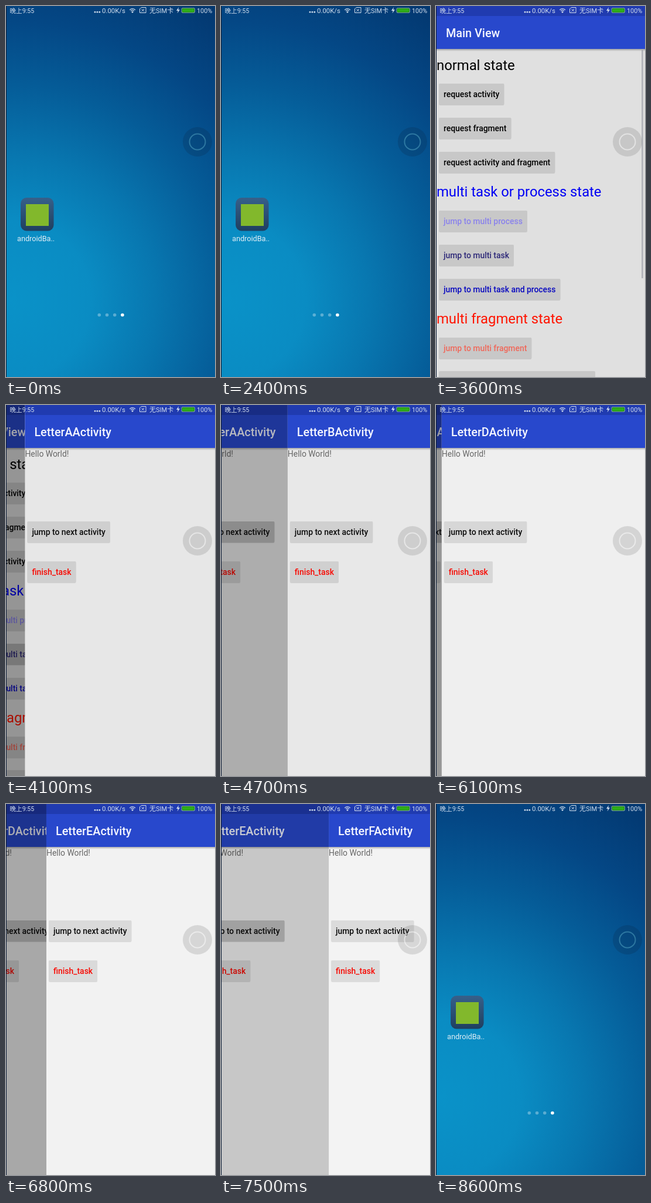
Write an HTML page with a canvas that moves like this. It is 357x631 px and loops after 9400 ms.

```html
<!DOCTYPE html>
<html lang="en">
<head>
<meta charset="utf-8">
<title>Activity transitions</title>
<style>
html, body { margin: 0; width: 100%; height: 100%; overflow: hidden; background: #064d8e; }
canvas { display: block; width: 357px; height: 631px; }
</style>
</head>
<body>
<canvas id="stage" width="357" height="631"></canvas>
<script>
const W = 357, H = 631, LOOP = 9400, SLIDE = 357, EDGE = 1;
const ctx = document.getElementById('stage').getContext('2d');
const ROBOTO = 'Roboto, sans-serif';
const STATUS_FONT = 'Roboto, "Noto Sans CJK SC", "Noto Sans CJK", sans-serif';

// The pages brighten slightly one after another.
const shades = { A: 231, B: 232, C: 236, D: 239, E: 242, F: 243 };
const slides = [
  { from: 'Main', to: 'A', start: 3850, press: 3600 },
  { from: 'A', to: 'B', start: 4545, press: 4400 },
  { from: 'B', to: 'C', start: 5100, press: 4960 },
  { from: 'C', to: 'D', start: 5800, press: 5690 },
  { from: 'D', to: 'E', start: 6600, press: 6390 },
  { from: 'E', to: 'F', start: 7400, press: 7290 }
];
const OPEN = 2420, CLOSE = 8180, ZOOM = 400;

const clamp = v => Math.max(0, Math.min(1, v));
const easeOut = p => 1 - (1 - p) ** 2;
const gray = (v, a = 1) => `rgba(${v},${v},${v},${a})`;

function rect(x, y, w, h, color) {
  ctx.fillStyle = color;
  ctx.fillRect(x, y, w, h);
}

function roundRect(x, y, w, h, r, color) {
  ctx.beginPath();
  ctx.roundRect(x, y, w, h, r);
  ctx.fillStyle = color;
  ctx.fill();
}

function disc(x, y, r, color) {
  ctx.beginPath();
  ctx.arc(x, y, r, 0, Math.PI * 2);
  ctx.fillStyle = color;
  ctx.fill();
}

function text(str, x, baseline, size, color, weight = 400, family = ROBOTO) {
  ctx.font = `${weight} ${size}px ${family}`;
  ctx.fillStyle = color;
  ctx.fillText(str, x, baseline);
}

function gradient(y0, y1, from, to) {
  const g = ctx.createLinearGradient(0, y0, 0, y1);
  g.addColorStop(0, from);
  g.addColorStop(1, to);
  return g;
}

function drawLauncher() {
  const g = ctx.createRadialGradient(10, 500, 0, 10, 500, 610);
  [[0, '#0a92c8'], [.22, '#0a8cc3'], [.4, '#0877b0'], [.6, '#055c98'], [.78, '#044785'], [1, '#03376f']]
    .forEach(([at, color]) => g.addColorStop(at, color));
  rect(0, 0, W, H, g);
  roundRect(25, 326, 56.5, 56.5, 10, gradient(326, 382, '#37608a', '#1f3f60'));
  rect(34, 337, 39, 37, '#82b82c');
  text('androidBa..', 19, 400, 12.7, '#e0eef6');
  for (let i = 0; i < 4; i++) {
    disc(159.3 + i * 13.2, 525.5, 2.8, gray(255, i === 3 ? 1 : .33));
  }
}

function button(label, y, color, shade, pressed) {
  ctx.font = `500 13.9px ${ROBOTO}`;
  const w = ctx.measureText(label).width + 16;
  roundRect(4, y - 18, w, 37, 2, gray(shade - 38, .6));
  roundRect(4, y - 18, w, 36, 2, gray(shade - 24));
  if (pressed) roundRect(4, y - 18, w, 36, 2, gray(0, .1 * pressed));
  text(label, 12, y + 5, 13.9, color, 500);
}

function drawBars(title, shade) {
  rect(0, 0, W, H, gray(shade));
  rect(0, 73, W, 4, gradient(73, 77, gray(0, .28), gray(0, 0)));
  rect(0, 0, W, 17, '#203bb0');
  rect(0, 17, W, 56, '#2848cc');
  text(title, 16, 53, 19.8, '#f4f6ff', 500);
}

function drawMain(press, t) {
  const shade = 224;
  drawBars('Main View', shade);
  const heading = (str, y, color) => text(str, 0, y, 23.8, color);
  heading('normal state', 109, '#000');
  button('request activity', 150, '#000', shade);
  button('request fragment', 208, '#000', shade);
  button('request activity and fragment', 266, '#000', shade);
  heading('multi task or process state', 324, '#0000f5');
  button('jump to multi process', 366, '#8a82ec', shade);
  button('jump to multi task', 424, '#2d2878', shade, press);
  button('jump to multi task and process', 482, '#0808c0', shade);
  heading('multi fragment state', 540, '#ff1400');
  button('jump to multi fragment', 582, '#f0685a', shade);
  roundRect(4, 621, 267, 36, 2, gray(shade - 24));
  rect(350, 75, 3, 388, `rgba(130,132,145,${.45 * (1 - clamp((t - 3650) / 250))})`);
}

function drawLetter(name, press, finishPress) {
  const shade = shades[name];
  drawBars(`Letter${name}Activity`, shade);
  text('Hello World!', 0, 88, 13.9, '#666');
  button('jump to next activity', 216, '#0a0a0a', shade, press);
  button('finish_task', 284, '#f80800', shade, finishPress);
}

function drawPage(name, x, t, dim = 0) {
  const leave = slides.find(s => s.from === name);
  const press = leave ? clamp((t - leave.press) / 100) : 0;
  ctx.save();
  ctx.translate(x, 0);
  if (name === 'Main') drawMain(press, t);
  else drawLetter(name, press, name === 'F' ? clamp((t - 8080) / 100) : 0);
  if (dim) rect(0, 0, W + 100, H, gray(0, dim));
  ctx.restore();
}

function drawZoomed(name, p, t) {
  const scale = .16 + .84 * p;
  ctx.save();
  ctx.globalAlpha = clamp(p * 1.8);
  ctx.translate(53 * (1 - p), 354 * (1 - p));
  ctx.scale(scale, scale);
  ctx.translate(-53 * (1 - p), -354 * (1 - p));
  ctx.beginPath();
  ctx.rect(0, 0, W, H);
  ctx.clip();
  drawPage(name, EDGE, t);
  ctx.restore();
}

function drawSlides(t) {
  const active = slides.filter(s => t >= s.start).pop();
  if (!active) return drawPage('Main', EDGE, t);
  const rest = 1 - easeOut(clamp((t - active.start) / SLIDE));
  const x = EDGE + (W - EDGE) * rest;
  if (rest > 0) {
    drawPage(active.from, Math.min(EDGE, .245 * x - 82), t, .37 * (1 - rest));
  }
  drawPage(active.to, x, t);
}

function drawBall(inApp) {
  disc(327, 231, 25, inApp ? gray(70, .16) : 'rgba(10,40,70,.22)');
  ctx.beginPath();
  ctx.arc(327, 231, 13.5, 0, Math.PI * 2);
  ctx.strokeStyle = inApp ? gray(255, .5) : 'rgba(120,210,225,.35)';
  ctx.lineWidth = 2;
  ctx.stroke();
}

function drawStatus() {
  const ink = '#d3dfee';
  const label = (str, x, size) => text(str, x, 11.5, size, ink, 400, STATUS_FONT);
  label('晚上9:55', 6.5, 10.6);
  for (let i = 0; i < 3; i++) disc(152 + i * 3.9, 10.3, 1.4, ink);
  label('0.00K/s', 164, 11.4);
  label('无SIM卡', 245, 11);
  label('100%', 326, 10.9);

  ctx.strokeStyle = ink;
  ctx.lineWidth = 1.2;
  for (const r of [3.6, 6.2]) {
    ctx.beginPath();
    ctx.arc(216, 10.8, r, -Math.PI * .78, -Math.PI * .22);
    ctx.stroke();
  }
  disc(216, 10.3, 1.4, ink);

  ctx.lineWidth = 1;
  ctx.beginPath();
  ctx.moveTo(231, 2.5);
  ctx.lineTo(239, 2.5);
  ctx.lineTo(239, 11.5);
  ctx.lineTo(228.5, 11.5);
  ctx.lineTo(228.5, 5);
  ctx.closePath();
  ctx.moveTo(231.5, 5);
  ctx.lineTo(236, 9.5);
  ctx.moveTo(236, 5);
  ctx.lineTo(231.5, 9.5);
  ctx.stroke();

  ctx.beginPath();
  [[295, 2], [291, 8], [293.8, 8], [292.6, 12.5], [297, 6.3], [294.2, 6.3]]
    .forEach(([x, y]) => ctx.lineTo(x, y));
  ctx.fillStyle = ink;
  ctx.fill();

  roundRect(299.5, 3, 23.5, 9, 3, '#8fb0b8');
  roundRect(300.3, 3.8, 21.9, 7.4, 2.4, '#1f6a28');
  roundRect(301, 4.4, 20.5, 6.2, 1.8, '#2fae18');
}

function render(t) {
  const opening = easeOut(clamp((t - OPEN) / ZOOM));
  const closing = easeOut(clamp((t - CLOSE) / ZOOM));
  const visible = opening * (1 - closing);
  if (visible < 1) drawLauncher();
  if (visible === 1) drawSlides(t);
  else if (visible > 0) drawZoomed(closing > 0 ? 'F' : 'Main', visible, t);
  rect(0, 0, 1, H, '#0c1c36');
  drawBall(visible > .5);
  drawStatus();
}

const begin = performance.now();
function tick() {
  render((performance.now() - begin) % LOOP);
  requestAnimationFrame(tick);
}
tick();
</script>
</body>
</html>
```
